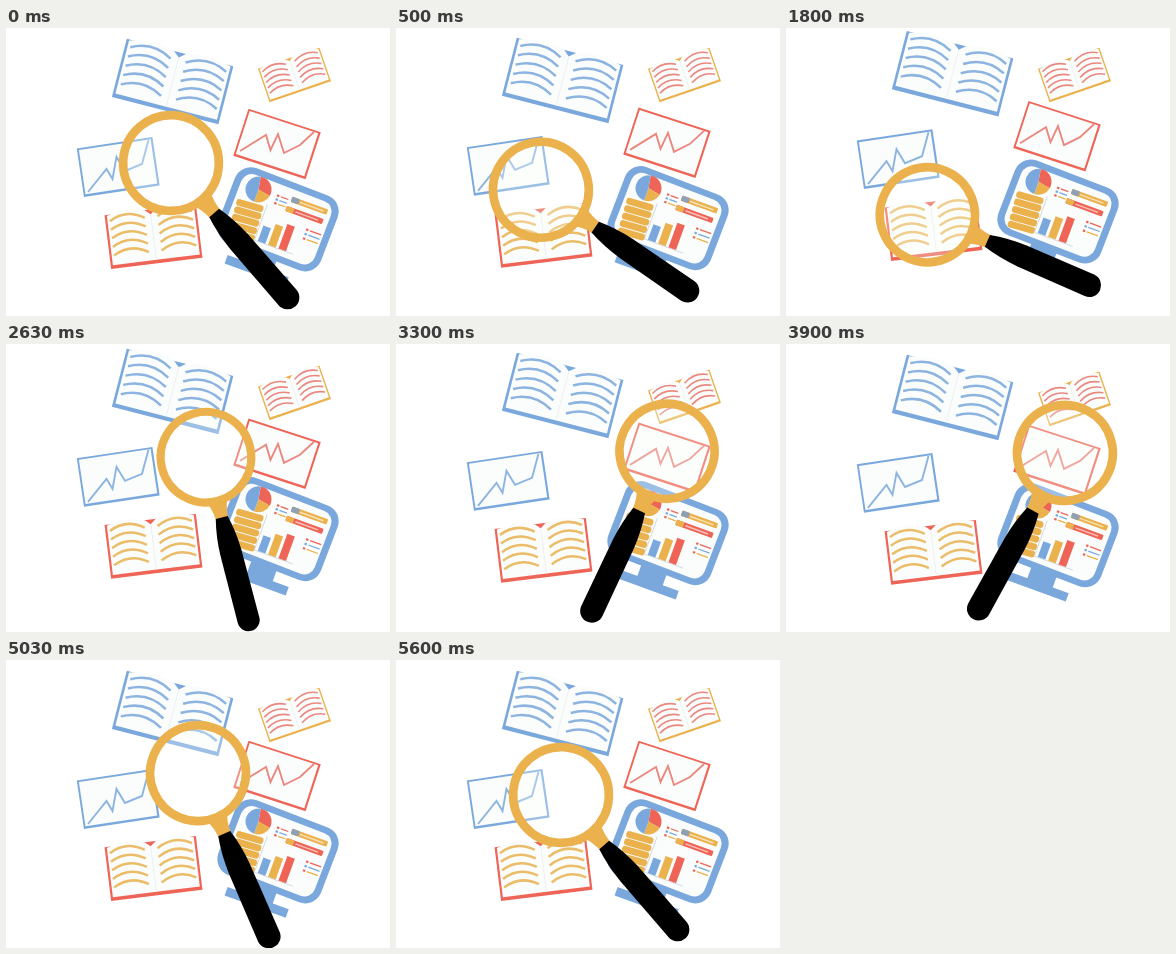
An HTML page with a canvas for the animation above (5630 ms loop, 384 by 288 pixels).

```html
<!DOCTYPE html>
<html lang="en">
<head>
<meta charset="utf-8">
<title>Research</title>
<style>
html, body { margin: 0; width: 100%; height: 100%; overflow: hidden; background: #fff; }
canvas { display: block; width: 384px; height: 288px; }
</style>
</head>
<body>
<canvas id="stage" width="384" height="288"></canvas>
<script>
const ctx = document.getElementById('stage').getContext('2d');
const LOOP = 5630;
const BLUE = '#7aa8dd', RED = '#ee6557', GOLD = '#eab14c', PAPER = '#fafdfb';
const SOFT_BLUE = '#8db4e0', SOFT_RED = '#ea8880', SOFT_GOLD = '#ebbd6a';
const rad = d => d * Math.PI / 180;
const mix = (a, b, p) => a + (b - a) * p;
const ease = p => (1 - Math.cos(Math.PI * Math.min(1, Math.max(0, p)))) / 2;

// Resting poses of the magnifier: x, y, handle angle
const START = [165, 135, 49.1], LOW = [138.8, 194.5, 20], HIGH = [279, 109, 119];
const MOVES = [
  { t0: 0, t1: 1000, from: START, to: LOW, bend: [-7, -3], shrink: 0 },
  { t0: 1560, t1: 3550, from: LOW, to: HIGH, bend: [-17.5, -34], shrink: 0.055 },
  { t0: 3870, t1: 5610, from: HIGH, to: START, bend: [-2, -20.5], shrink: 0 }
];

function at(x, y, deg, draw) {
  ctx.save();
  ctx.translate(x, y);
  ctx.rotate(rad(deg));
  draw();
  ctx.restore();
}

function box(x, y, w, h, color, r = 0) {
  ctx.fillStyle = color;
  ctx.beginPath();
  ctx.roundRect(x, y, w, h, r);
  ctx.fill();
}

function poly(points, color, width) {
  ctx.beginPath();
  points.forEach(([x, y]) => ctx.lineTo(x, y));
  ctx.strokeStyle = color;
  ctx.lineWidth = width;
  ctx.stroke();
}

function book(x, y, deg, w, h, cover, ink, edge, line) {
  at(x, y, deg, () => {
    const l = -w / 2, t = -h / 2, k = h / 58;
    box(l, t, w, h, cover);
    ctx.fillStyle = PAPER;
    for (const s of [-1, 1]) {
      ctx.beginPath();
      ctx.moveTo(s * (w / 2 - edge), h / 2 - edge * 1.6);
      ctx.lineTo(s * (w / 2 - edge), t + 1);
      ctx.quadraticCurveTo(s * w * 0.25, t - 7 * k, s * 6 * k, t);
      ctx.lineTo(0, t + 5 * k);
      ctx.lineTo(0, h / 2 - edge * 1.6);
      ctx.fill();
    }
    poly([[0, t + 6 * k], [0, h / 2 - edge * 1.6]], '#f1f4f4', 1);

    ctx.strokeStyle = ink;
    ctx.lineWidth = line;
    for (let i = 0; i < 5; i++) {
      const ly = t + h * (0.12 + i * 0.16);
      for (const s of [-1, 1]) {
        ctx.beginPath();
        ctx.moveTo(s * w * 0.45, ly);
        ctx.quadraticCurveTo(s * w * 0.26, ly - 11 * k, s * w * 0.07, ly + k);
        ctx.stroke();
      }
    }
  });
}

function chart(x, y, deg, w, h, color, ink, points) {
  at(x, y, deg, () => {
    box(-w / 2, -h / 2, w, h, color);
    box(-w / 2 + 1.9, -h / 2 + 1.9, w - 4, h - 4.4, PAPER);
  });
  poly(points, ink, 1.9);
}

function pie(x, y, r) {
  [[RED, -80, 30], [GOLD, 30, 110], [BLUE, 110, 280]].forEach(([color, a, b]) => {
    ctx.fillStyle = color;
    ctx.beginPath();
    ctx.moveTo(x, y);
    ctx.arc(x, y, r, rad(a), rad(b));
    ctx.fill();
  });
}

function notes(x, y, len, gap) {
  [RED, BLUE, GOLD].forEach((color, i) => {
    box(x, y + i * gap, 2.4, 2.2, i === 1 ? BLUE : RED);
    box(x + 4, y + i * gap + 0.5, len, 1.3, color);
  });
}

function monitor() {
  at(272, 191, 20, () => {
    box(-14, 36, 27, 17, BLUE);
    box(-35, 51, 65, 9, BLUE);
  });
  at(272, 191.3, 21, () => {
    box(-55, -40, 110, 80, BLUE, 17);
    box(-48, -33.5, 96, 67, PAPER, 11);
  });
  pie(252.5, 161.5, 13);
  at(239.5, 192.5, 16, () => {
    for (let i = 0; i < 5; i++) box(-14, -19 + i * 7.7, 28, 6.8, GOLD, 3);
  });
  at(272, 191, 20, () => {
    notes(-9, -23, 8, 4);
    box(6, -26, 38, 5.5, GOLD, 1);
    box(6, -26, 8, 5.5, '#8f9fb5', 1);
    box(15, -23.8, 25, 1.4, '#f8e1b4');
    box(4, -15.5, 39, 5.5, RED, 1);
    box(4, -15.5, 8, 5.5, GOLD, 1);
    box(14, -13.3, 24, 1.4, '#f9c1b8');
    poly([[-15, -10], [-15, 28], [26, 28]], '#cbd6df', 0.8);
    box(-11.5, 11, 8, 16.5, BLUE);
    box(-0.5, 5.5, 8, 22, GOLD);
    box(10.5, 1.5, 8, 26, RED);
    notes(30, -1, 12, 4.7);
  });
}

function magnifier([x, y, deg, k]) {
  at(x, y, deg, () => {
    ctx.scale(k, k);
    ctx.fillStyle = 'rgba(250,253,251,0.26)';
    ctx.beginPath();
    ctx.arc(0, 0, 45, 0, 7);
    ctx.fill();

    ctx.fillStyle = GOLD;
    ctx.beginPath();
    ctx.moveTo(48, -11);
    ctx.quadraticCurveTo(56, -7, 68, -6.5);
    ctx.lineTo(68, 6.5);
    ctx.quadraticCurveTo(56, 7, 48, 11);
    ctx.fill();

    ctx.strokeStyle = GOLD;
    ctx.lineWidth = 8.6;
    ctx.beginPath();
    ctx.arc(0, 0, 47.9, 0, 7);
    ctx.stroke();

    ctx.fillStyle = '#000';
    ctx.beginPath();
    ctx.moveTo(66, -6.5);
    ctx.quadraticCurveTo(84, -11, 104, -11.5);
    ctx.lineTo(178, -11.8);
    ctx.arc(178, 0, 11.8, -Math.PI / 2, Math.PI / 2);
    ctx.lineTo(104, 11.5);
    ctx.quadraticCurveTo(84, 11, 66, 6.5);
    ctx.fill();
  });
}

function pose(t) {
  const m = MOVES.filter(m => t >= m.t0).pop();
  const p = ease((t - m.t0) / (m.t1 - m.t0));
  const arc = 4 * p * (1 - p);
  const [x, y, deg] = m.from.map((v, i) => mix(v, m.to[i], p));
  return [x + m.bend[0] * arc, y + m.bend[1] * arc, deg, 1 - m.shrink * arc];
}

const lift = t => t < 4000 ? -8 * Math.sin(Math.PI * t / 4000) ** 2 : 0;

function draw(t) {
  ctx.fillStyle = '#fff';
  ctx.fillRect(0, 0, 384, 288);

  ctx.save();
  ctx.translate(0, lift(t));
  book(166.6, 53.6, 14.4, 110, 60, BLUE, SOFT_BLUE, 2.6, 2.5);
  chart(112.2, 139, -8.5, 76.5, 49, BLUE, SOFT_BLUE,
    [[82, 164], [100.5, 141], [106.5, 151], [110.5, 129], [119, 143], [136, 136], [142.5, 112]]);
  book(147.5, 208.5, -7, 92, 54, RED, SOFT_GOLD, 2.2, 2.5);
  monitor();
  chart(271, 116, 18, 76, 49.5, RED, SOFT_RED,
    [[234, 123], [260, 107], [264.5, 122], [272, 106], [278, 125], [294, 117], [308, 104]]);
  ctx.restore();

  // The small book waits at the top before sinking with the rest
  ctx.save();
  ctx.translate(0, t < 2000 ? -8 : lift(t));
  book(288.5, 55, -19, 65, 35.5, GOLD, SOFT_RED, 1.4, 1.6);
  ctx.restore();

  magnifier(pose(t));
}

function tick(now) {
  const t = now % LOOP;
  draw(Math.floor(t / 100) * 100 + (t % 100 >= 30 ? 30 : 0));
  requestAnimationFrame(tick);
}
draw(0);
requestAnimationFrame(tick);
</script>
</body>
</html>
```
